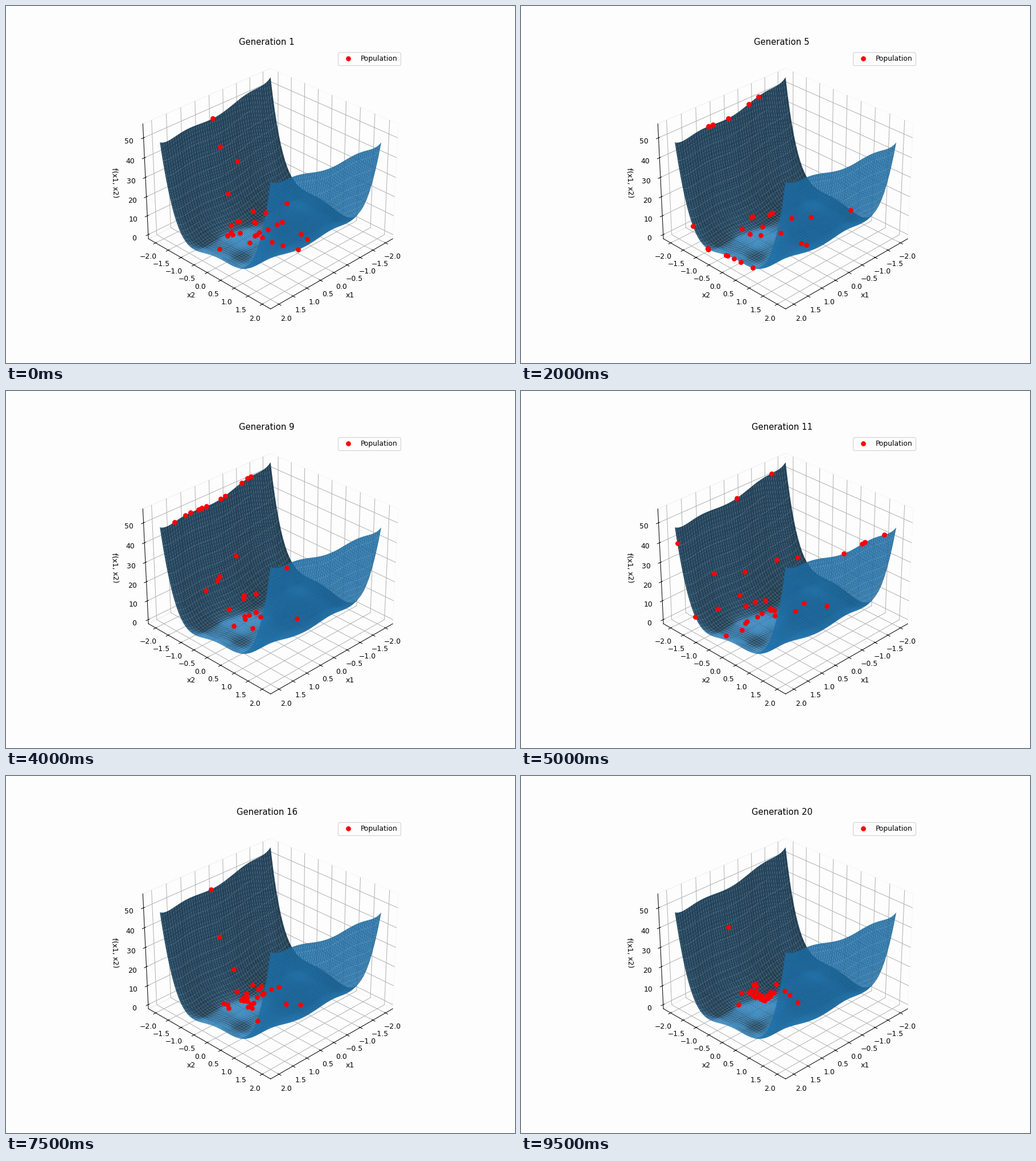
These frames come from a looping animation (894 px wide and 626 px high, 10000 ms). A matplotlib script:

```python
import numpy as np
import matplotlib.pyplot as plt
from matplotlib.animation import FuncAnimation

WIDTH, HEIGHT, DPI = 894, 626, 89.4
GENERATIONS, SIZE = 20, 30
BOUND = 2
OPTIMUM = (0.09, -0.71)

# Key generations; the values between them are interpolated.
KEYS = [1, 5, 9, 11, 13, 16, 20]
SPREAD = [0.55, 0.6, 0.45, 0.7, 0.45, 0.33, 0.24]
ON_BACK = [0, 6, 12, 0, 9, 0, 0]     # individuals stuck at x2 = -2
ON_LEFT = [0, 10, 0, 1, 0, 0, 0]     # individuals stuck at x1 = 2
ON_RIGHT = [0, 0, 0, 3, 0, 0, 0]     # individuals stuck at x2 = 2


def camel(x1, x2):
    """Six-hump camel function."""
    return (4 - 2.1 * x1**2 + x1**4 / 3) * x1**2 + x1 * x2 + (4 * x2**2 - 4) * x2**2


def at(generation, values):
    return np.interp(generation, KEYS, values)


def population(generation):
    """Individuals around the optimum, some of them held at the bounds."""
    rng = np.random.default_rng(generation)
    x1, x2 = rng.laplace(OPTIMUM, at(generation, SPREAD), (SIZE, 2)).T
    back, left, right = (round(at(generation, share))
                         for share in (ON_BACK, ON_LEFT, ON_RIGHT))
    stuck_back = slice(0, back)
    stuck_left = slice(back, back + left)
    stuck_right = slice(back + left, back + left + right)
    x1[stuck_back], x2[stuck_back] = rng.uniform(-1.3, 1.8, back), -BOUND
    x1[stuck_left], x2[stuck_left] = BOUND, rng.uniform(-BOUND, 1, left)
    x1[stuck_right], x2[stuck_right] = rng.uniform(-1.8, 0.3, right), BOUND
    x1, x2 = np.clip([x1, x2], -BOUND, BOUND)
    return x1, x2, camel(x1, x2)


plt.rcParams.update({"figure.facecolor": "#fdfdfd", "axes.facecolor": "#fdfdfd"})
fig = plt.figure(figsize=(WIDTH / DPI, (HEIGHT + 1e-6) / DPI), dpi=DPI)
ax = fig.add_subplot(projection="3d")
ax.view_init(elev=30, azim=45)
steps = np.linspace(-BOUND, BOUND, 100)
x1, x2 = np.meshgrid(steps, steps)
ax.plot_surface(x1, x2, camel(x1, x2), color="C0", alpha=0.9)
ax.set(xlabel="x1", ylabel="x2", zlabel="f(x1, x2)")
for axis in (ax.xaxis, ax.yaxis, ax.zaxis):
    axis.pane.fill = False

# The high zorder keeps individuals in front of the surface.
dots, = ax.plot(*population(1), "ro", label="Population", zorder=10)
ax.legend(loc="upper right")
title = ax.set_title("Generation 1")


def update(frame):
    generation = frame + 1
    dots.set_data_3d(*population(generation))
    title.set_text(f"Generation {generation}")
    return dots, title


anim = FuncAnimation(fig, update, frames=GENERATIONS, interval=500,
                     repeat=True, repeat_delay=0)
plt.show()
```
